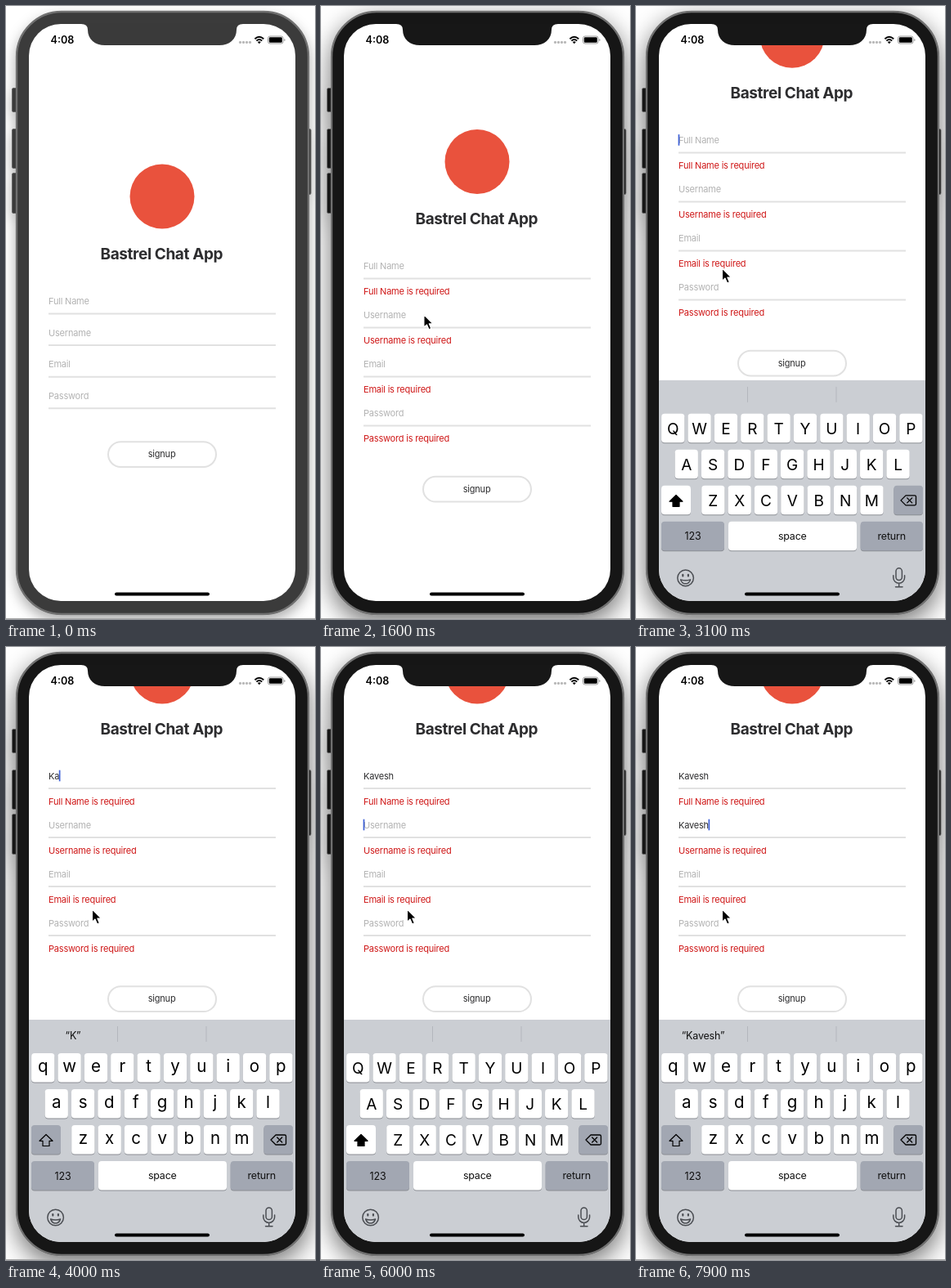
Recreate the animation shown at these times as an HTML page. Size 378x750 px, loop 8 s.

```html
<!DOCTYPE html>
<html lang="en">
<head>
<meta charset="utf-8">
<title>Signup form</title>
<style>
  html, body { margin: 0; height: 100%; overflow: hidden; background: #fff; }
  svg { display: block; width: 378px; height: 750px; }
  text { font: 11px Inter, Roboto, sans-serif; letter-spacing: -.2px; fill: #2d2d2f; white-space: pre; }
  .mid { text-anchor: middle; }
  .title { font-size: 19px; font-weight: 700; letter-spacing: -.4px; }
  .clock { font-size: 12.6px; font-weight: 600; letter-spacing: 0; fill: #000; }
  .hint { fill: #b2b2b2; }
  .error { fill: #cf1717; }
  .key { font-size: 19px; letter-spacing: 0; fill: #000; }
  .small { font-size: 12.5px; fill: #111; }
  .rule { stroke: #e1e1e1; stroke-width: 2; }
  .icon { fill: none; stroke: #4b4e53; stroke-width: 1.5; stroke-linecap: round; stroke-linejoin: round; }
</style>
</head>
<body>
<svg viewBox="0 0 378 750">
  <defs>
    <clipPath id="screen"><rect x="28" y="22" width="326" height="706" rx="39"/></clipPath>
    <filter id="soft" x="-30%" y="-20%" width="160%" height="140%">
      <feDropShadow dx="0" dy="7" stdDeviation="8" flood-opacity=".32"/>
    </filter>
    <filter id="deep" x="-30%" y="-20%" width="160%" height="140%">
      <feDropShadow dx="0" dy="10" stdDeviation="15" flood-opacity=".55"/>
    </filter>
  </defs>
  <g id="phone">
    <g id="buttons" stroke="#666" stroke-width="1">
      <rect x="7.5" y="100.5" width="8" height="29" rx="1.5"/>
      <rect x="7.5" y="150.5" width="8" height="48" rx="1.5"/>
      <rect x="7.5" y="204.5" width="8" height="49" rx="1.5"/>
      <rect x="365" y="150.5" width="8" height="80" rx="1.5"/>
    </g>
    <rect id="body" x="13" y="7" width="357" height="737" rx="55" stroke="#707070" stroke-width="2.4"/>
  </g>
  <path d="M0 749.5H378" stroke="#aaa"/>
  <g clip-path="url(#screen)">
    <rect x="28" y="22" width="326" height="706" fill="#fff"/>
    <g id="page">
      <g id="head">
        <circle cx="191" cy="233" r="39.5" fill="#e9523d"/>
        <text class="title mid" x="190.3" y="310">Bastrel Chat App</text>
      </g>
      <g id="form"></g>
      <g id="signup">
        <rect x="125" y="533.2" width="132" height="30.8" rx="15.4" fill="#fff" stroke="#e1e1e1" stroke-width="2"/>
        <text class="mid" x="190.6" y="552">signup</text>
      </g>
    </g>
    <g id="board"></g>
    <text class="clock" x="54.5" y="46">4:08</text>
    <g fill="#b8b8b8">
      <circle cx="286.5" cy="44.4" r="1.6"/><circle cx="290.5" cy="44.4" r="1.6"/>
      <circle cx="294.5" cy="44.4" r="1.6"/><circle cx="298.5" cy="44.4" r="1.6"/>
    </g>
    <path d="M304.4 40.2Q309.8 35.2 315.2 40.2M306.4 42.6Q309.8 39.6 313.2 42.6" fill="none" stroke="#000" stroke-width="1.9"/>
    <path d="M307.8 44Q309.8 42.3 311.8 44L309.8 46.2Z"/>
    <rect x="320.5" y="37" width="18.6" height="9" rx="2.4" fill="#fff" stroke="#999"/>
    <rect x="321.8" y="38.3" width="16" height="6.4" rx="1.3"/>
    <path d="M340.3 40v3q1.3-.5 1.3-1.5t-1.3-1.5" fill="#999"/>
    <rect x="133" y="717.4" width="116" height="4.2" rx="2.1"/>
  </g>
  <path id="notch" d="M92 21.5V22Q100 22 100 29C100 41 109 48 121 48H261C273 48 282 41 282 29Q282 22 290 22V21.5Z"/>
  <path id="mouse" d="M0 0V15.2L3.5 12 6.1 18 8.8 16.8 6.3 11H11Z" stroke="#fff" stroke-width="1.1" stroke-linejoin="round"/>
</svg>
<script>
const LOOP = 8000, NAME = 'Kavesh';
const $ = id => document.getElementById(id);
const show = (el, on) => el.setAttribute('visibility', on ? 'inherit' : 'hidden');
const move = (el, x, y) => el.setAttribute('transform', `translate(${x} ${y})`);
const put = (el, s) => { if (el.textContent !== s) el.textContent = s; };

// Form rows, drawn relative to their rule
$('form').innerHTML = ['Full Name', 'Username', 'Email', 'Password'].map(label => `<g>
  <path class="rule" d="M52 0H330"/>
  <text class="hint" x="52" y="-11.5">${label}</text>
  <text class="value" x="52" y="-11.5"></text>
  <text class="error" x="52" y="19.5">${label} is required</text>
  <rect class="caret" y="-22.3" width="1.7" height="13.6" fill="#3f62d8"/></g>`).join('');
const rows = [...$('form').children].map(g => ({
  g, hint: g.querySelector('.hint'), value: g.querySelector('.value'),
  error: g.querySelector('.error'), caret: g.querySelector('.caret')
}));

// Keyboard
const DARK = '#a2a7b2';
const cap = (x, y, w, fill = '#fff', id = '') =>
  `<rect x="${x}" y="${y + 1}" width="${w}" height="35.4" rx="4" fill="#8b8e94"/>
   <rect ${id} x="${x}" y="${y}" width="${w}" height="35.4" rx="4" fill="${fill}"/>`;
const letters = (chars, x0, y) => [...chars].map((c, i) => {
  const x = x0 + i * 32.35;
  return cap(x, y, 28.3) + `<text class="key mid" x="${x + 14.1}" data-y="${y}">${c}</text>`;
}).join('');
const label = (s, x, y = 651) => `<text class="small mid" x="${x}" y="${y}">${s}</text>`;

$('board').innerHTML = `
  <rect x="28" y="456" width="326" height="273" fill="#cbced3"/>
  <path d="M136.5 464V483M245 464V483" stroke="#b4b7bd"/>
  <text id="guess" class="small mid" x="82" y="480"></text>
  ${letters('QWERTYUIOP', 31.1, 497)}${letters('ASDFGHJKL', 47.6, 541)}${letters('ZXCVBNM', 80.2, 585)}
  ${cap(31, 585, 36, DARK, 'id="shift"')}${cap(315.4, 585, 35.6, DARK)}
  ${cap(31, 629, 77, DARK)}${cap(113, 629, 157)}${cap(274.7, 629, 76.3, DARK)}
  ${label('123', 69.5, 651.5)}${label('space', 191.3)}${label('return', 312.7)}
  <path id="arrow" d="M49 596.5L57 604.3H53V610.5H45V604.3H41Z" stroke="#000" stroke-width="1.2" stroke-linejoin="round"/>
  <path class="icon" style="stroke:#000;stroke-width:1.3" d="M324 603L330 597H341Q342.5 597 342.5 598.5V607.5Q342.5 609 341 609H330ZM331.7 600L337.7 606M337.7 600L331.7 606"/>
  <g class="icon"><circle cx="60.6" cy="698" r="9.8"/>
    <path d="M54.6 700Q60.6 702 66.6 700Q65 705 60.6 705T54.6 700Z"/>
    <path stroke-width="2.2" d="M57.3 694V695.6M63.9 694V695.6"/></g>
  <g class="icon"><rect x="318" y="686" width="7.4" height="14.6" rx="3.7"/>
    <path d="M314.8 695V697.5A6.9 6.9 0 0 0 328.6 697.5V695M321.7 704.5V708.5M317.5 708.8H326"/></g>`;
const keys = [...document.querySelectorAll('.key')];

// Typing
const typing = [[3800, 3950, 4150, 4350, 4550, 4750], [6600, 6820, 7040, 7260, 7480, 7700]];
const FOCUS = [2900, 5000];
const typed = (field, t) => NAME.slice(0, typing[field].filter(k => k <= t).length);

// Pointer: time, x, y
const path = [[100, 224, 732], [280, 224, 732], [700, 190, 552], [1120, 190, 552], [1600, 126, 378], [2200, 105.5, 321]];
const clamp = v => Math.max(0, Math.min(1, v));
function pointer(t) {
  let i = 0;
  while (i < path.length - 2 && t > path[i + 1][0]) i++;
  const [a, x, y] = path[i], [b, u, v] = path[i + 1];
  const p = clamp((t - a) / (b - a)), e = i === 4 ? 1 - (1 - p) ** 2 : p;
  return [x + (u - x) * e, y + (v - y) * e];
}

// Critically damped spring from 0 to 1
const spring = ms => {
  const x = Math.max(0, ms) * .0187;
  return x > 14 ? 1 : 1 - (1 + x) * Math.exp(-x);
};

function draw(t) {
  const active = t >= 500, tone = active ? '#171717' : '#3a3a3a';
  for (const id of ['body', 'buttons', 'notch']) $(id).setAttribute('fill', tone);
  $('phone').setAttribute('filter', `url(#${active ? 'deep' : 'soft'})`);

  const failed = t >= 1000;
  const shift = failed ? 42.6 : 0;
  move($('head'), 0, -shift);
  move($('signup'), 0, shift);
  const press = t < 1000 ? clamp((t - 850) / 100) : clamp((1250 - t) / 250);
  $('signup').setAttribute('opacity', 1 - .7 * press);
  move($('page'), 0, -160.5 * spring(t - 2833));
  move($('board'), 0, 272 * (1 - spring(t - 2723)));
  show($('board'), t > 2723);

  const focus = t >= FOCUS[1] ? 1 : t >= FOCUS[0] ? 0 : -1;
  rows.forEach((row, i) => {
    move(row.g, 0, failed ? 333.5 + 60 * i : 376.5 + 38.6 * i);
    const word = i < 2 ? typed(i, t) : '';
    put(row.value, word);
    show(row.hint, !word);
    show(row.error, failed);
    let lit = false;
    if (i === focus) {
      const last = Math.max(FOCUS[i], ...typing[i].filter(k => k <= t));
      lit = (t - last) % 1000 < 600;
      row.caret.setAttribute('x', 51.6 + (word ? row.value.getComputedTextLength() : 0));
    }
    show(row.caret, lit);
  });

  const lower = focus >= 0 && typed(focus, t) !== '';
  for (const k of keys) {
    const c = k.textContent;
    put(k, lower ? c.toLowerCase() : c.toUpperCase());
    k.setAttribute('y', +k.dataset.y + (lower ? 23.3 : 25));
    k.style.fontSize = lower ? '20.5px' : '19px';
  }
  $('shift').setAttribute('fill', lower ? DARK : '#fff');
  $('arrow').setAttribute('fill', lower ? 'none' : '#000');
  const guess = lower ? typed(focus, t - 150) : '';
  put($('guess'), guess && `“${guess}”`);

  show($('mouse'), t >= 100);
  move($('mouse'), ...pointer(t));
}

function tick() {
  draw(performance.now() % LOOP);
  requestAnimationFrame(tick);
}
tick();
</script>
</body>
</html>
```
